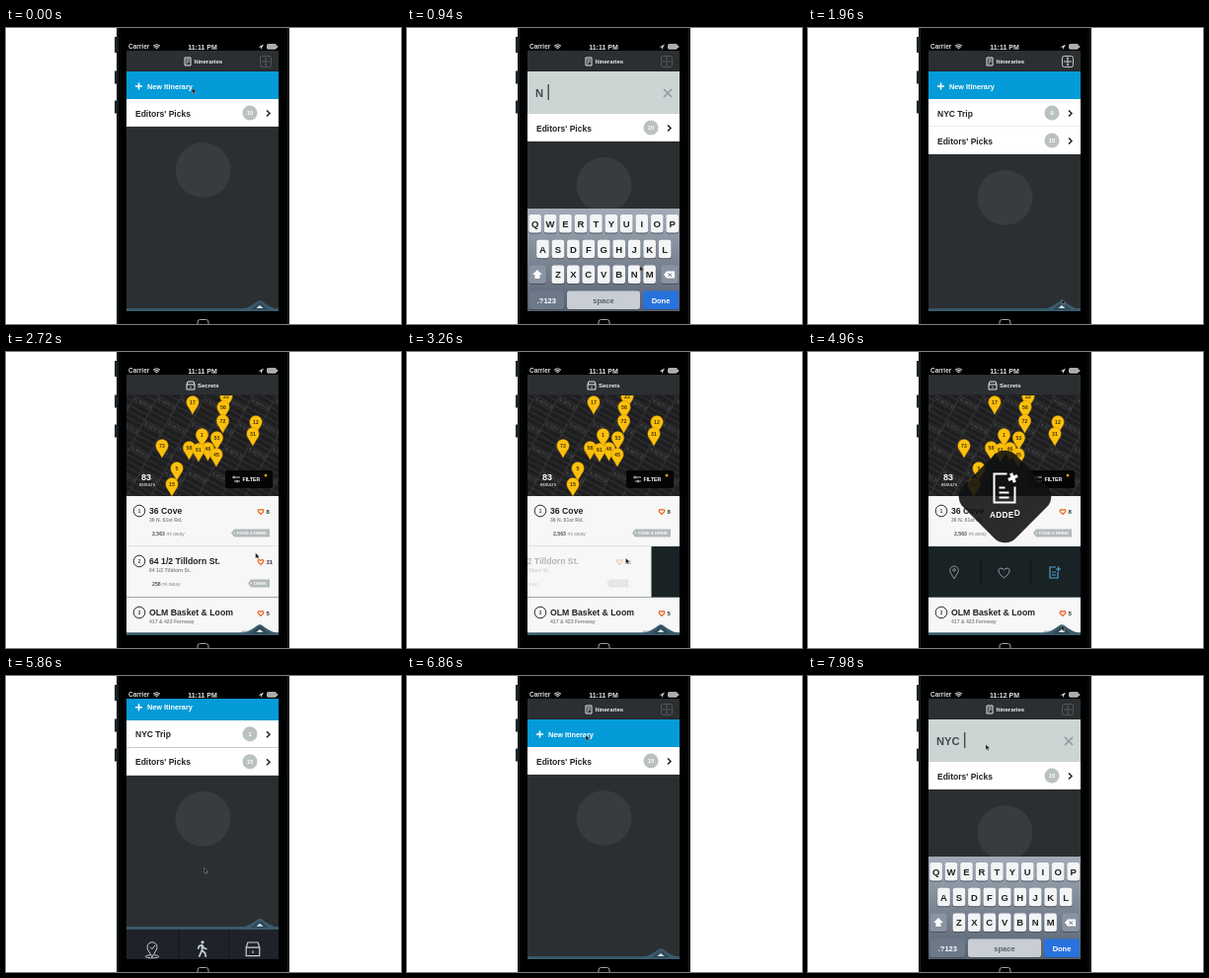
Write an HTML page with a canvas that moves like this. It is 400 px wide and 300 px high and loops after 8 s.

```html
<!DOCTYPE html>
<html lang="en">
<head>
<meta charset="utf-8">
<title>Itinerary app</title>
<style>
html, body { margin: 0; width: 100%; height: 100%; overflow: hidden; background: #fff; }
canvas { display: block; width: 100vw; height: 100vh; }
</style>
</head>
<body>
<canvas id="stage"></canvas>
<script>
const LOOP = 8000;
const LEFT = 122, WIDTH = 154, TOP = 23, BOTTOM = 287, MENU = 104;
const BLUE = '#049bd8', DARK = '#2b2f32', GOLD = '#fdc00d', INK = '#222';
const canvas = document.getElementById('stage');
const c = canvas.getContext('2d');
const ratio = window.devicePixelRatio || 1;
canvas.width = 400 * ratio;
canvas.height = 300 * ratio;

const clamp = v => Math.max(0, Math.min(1, v));
const ramp = (t, a, b) => { const p = clamp((t - a) / (b - a)); return p * p * (3 - 2 * p); };
const pulse = (t, a, b, d, e) => ramp(t, a, b) - ramp(t, d, e);
const between = (t, a, b) => t >= a && t < b;

function rect(x, y, w, h, fill) { c.fillStyle = fill; c.fillRect(x, y, w, h); }
function round(x, y, w, h, r, fill, stroke, line = 1) {
  c.beginPath(); c.roundRect(x, y, w, h, r);
  if (fill) { c.fillStyle = fill; c.fill(); }
  if (stroke) { c.strokeStyle = stroke; c.lineWidth = line; c.stroke(); }
}
function circle(x, y, r, fill, stroke, line) { round(x - r, y - r, 2 * r, 2 * r, r, fill, stroke, line); }
function path(d, x, y, { fill, stroke, line = 1, scale = 1 } = {}) {
  c.save(); c.translate(x, y); c.scale(scale, scale);
  const p = new Path2D(d);
  if (fill) { c.fillStyle = fill; c.fill(p); }
  if (stroke) { c.strokeStyle = stroke; c.lineWidth = line; c.stroke(p); }
  c.restore();
}
// y is the middle of the capitals
function text(s, x, y, size, color, align = 'left', weight = 'bold') {
  c.font = `${weight} ${size}px "Liberation Sans", Arial, sans-serif`;
  c.textAlign = align; c.fillStyle = color;
  c.fillText(s, x, y + size * 0.36);
}
function clipped(x, y, w, h, draw) {
  c.save(); c.beginPath(); c.rect(x, y, w, h); c.clip(); draw(); c.restore();
}
function shifted(dx, dy, draw) { c.save(); c.translate(dx, dy); draw(); c.restore(); }

const PLUS = 'M-3.5 0H3.5M0-3.5V3.5';
const HEART = 'M0 3C-6-1-3-5 0-2 3-5 6-1 0 3Z';
const PIN = 'M0 8C-2.5 3-5 1-5-2A5 5 0 0 1 5-2C5 1 2.5 3 0 8Z';

const docIcon = (x, y, color, line = 1) =>
  path('M-3-4H3V4H-3ZM-1.5-2H1.5M-1.5 0H1.5M-1.5 2H0', x, y, { stroke: color, line });
const boxIcon = (x, y, color, line = 1, scale = 1) =>
  path('M-4-1L-3-4H3L4-1V4H-4ZM-4-1H4M0 1V2.5', x, y, { stroke: color, line, scale });
const walker = (x, y, color) => {
  circle(x + 0.5, y - 7, 1.6, color);
  path('M0-4.5V1L-3 8M0 1L3 4L4 8M-4 0L-3-3L0-4L2-1L5 0', x, y, { stroke: color, line: 1.7 });
};

function phone(t) {
  rect(0, 0, 400, 300, '#fff');
  [[9, 16], [43.5, 13], [73.5, 13]].forEach(([y, h]) => rect(110, y, 3, h, '#20272c'));
  rect(112, 0, 175, 300, '#161d22');
  rect(114, 0, 171, 300, '#020303');
  rect(117, 0, 165, 300, '#000');
  round(194, 295.5, 11, 10, 2.5, null, '#a0a4a6', 1);
  text('Carrier', 124, 19, 6.5, '#ddd');
  [1.4, 3.2, 5].forEach(r => {
    c.beginPath(); c.arc(152.5, 22, r, -2.3, -0.84);
    c.strokeStyle = '#ddd'; c.lineWidth = 1.1; c.stroke();
  });
  text(t < 7700 ? '11:11 PM' : '11:12 PM', 199, 19, 7, '#e4e4e4', 'center');
  path('M-2.5.5L3-2.5L0 3V.5Z', 258, 19, { fill: '#ddd' });
  round(264.5, 16.6, 9, 4.6, 0.8, '#aaa', '#ddd', 0.7);
  rect(274.2, 18, 1, 2, '#ddd');
}

function header(title, icon) {
  rect(LEFT, TOP, WIDTH, 21, DARK);
  rect(LEFT, TOP + 20.4, WIDTH, 0.6, '#1d2022');
  const itineraries = title === 'Itineraries';
  icon(itineraries ? 184 : 187, TOP + 11, '#e8e8e8');
  text(title, itineraries ? 190.5 : 194, TOP + 11, 6, '#eee');
}

function itemRow(name, y, { count, radio } = {}) {
  const selectable = radio !== undefined;
  rect(LEFT, y, WIDTH, 28, '#fff');
  rect(LEFT, y + 27.5, WIDTH, 0.5, '#d4d8d9');
  text(name, selectable ? 150 : 131, y + 14.5, 8.5, INK);
  if (selectable) {
    circle(135, y + 14, 7, '#e1eded', '#bfcccf', 0.8);
    if (radio) circle(135, y + 14, 4.7, '#108fcb', '#0873a8', 0.6);
  } else {
    circle(247, y + 14, 7.5, '#bac1c1');
    text(count, 247, y + 14, 5.7, '#fff', 'center');
    path('M-1.5-3L1.5 0L-1.5 3', 265.5, y + 14.5, { stroke: INK, line: 1.5 });
  }
}

function newRow(y, hint = 1) {
  rect(LEFT, y, WIDTH, 28, BLUE);
  c.save(); c.globalAlpha = hint;
  path(PLUS, 134.5, y + 15, { stroke: '#fff', line: 1.5 });
  text('New Itinerary', 143, y + 15, 7.3, '#fff');
  c.restore();
}

const seal = y => circle(199.5, y, 28, '#363c3f');

function typedText(t) {
  const n = t < 4000 ? Math.floor((t - 890) / 58) + 1 : Math.floor((t - 7380) / 240) + 1;
  return 'NYC Trip'.slice(0, Math.max(0, n));
}

function itineraries(t) {
  const grow = pulse(t, 860, 940, 1470, 1600) + ramp(t, 6950, 7100);
  const trip = pulse(t, 1470, 1650, 6640, 6800);
  const editing = between(t, 860, 1530) || t >= 6950;
  rect(LEFT, TOP, WIDTH, 400, DARK);
  header('Itineraries', docIcon);
  const tool = trip > 0.5 ? '#d8dbdc' : '#565c60';
  round(257.5, 28.5, 11, 11, 2, null, tool, 0.9);
  path('M-4 0H4M0-4V4M-1-3L0-4L1-3M-1 3L0 4L1 3', 263, 34, { stroke: tool, line: 0.9 });
  const height = 28 + 15 * grow, listTop = 44 + height;
  if (editing) {
    rect(LEFT, 44, WIDTH, height, '#cdd4d4');
    const s = typedText(t);
    text(s, 130, 66, 11.2, '#444b4e');
    const caret = 130 + c.measureText(s).width + 4.5;
    rect(caret, 57, 1.2, 16, '#333');
    path('M-4-4L4 4M4-4L-4 4', 264, 66, { stroke: '#8f9899', line: 1.5 });
  } else {
    rect(LEFT, 44, WIDTH, height, BLUE);
    newRow(44, 1 - 0.5 * pulse(t, 120, 200, 860, 861));
  }
  clipped(LEFT, listTop, WIDTH, 28 * trip, () =>
    itemRow('NYC Trip', listTop, { count: t > 4300 ? '1' : '0' }));
  itemRow("Editors' Picks", listTop + 28 * trip, { count: '15' });
  seal(listTop + 28 * trip + 72);
}

const PINS = [[189, 51, 17], [223, 45, 22], [220, 56, 56], [219.5, 70, 72], [253, 71, 12], [250, 83, 31],
  [198.5, 84, 1], [213.5, 87, 53], [158, 95, 73], [185.5, 97, 58], [204.5, 98, 46], [195, 99, 61],
  [213, 104, 45], [173, 118, 5], [168, 134, 15]];

function map() {
  clipped(LEFT, 44, WIDTH, 102, () => {
    rect(LEFT, 44, WIDTH, 102, '#333335');
    c.save(); c.translate(199, 95); c.rotate(0.5);
    for (let i = -6; i < 6; i++) for (let j = -16; j < 16; j++) {
      rect(i * 21, j * 5.6, 19.8, 4.6, '#1f1f21');
      if ((i * 2 + j) % 5 === 0) text(`N ${44 - j}TH ST`, i * 21 + 1, j * 5.6 + 2.3, 4.2, '#68686b', 'left', 'normal');
    }
    c.restore();
    PINS.forEach(([x, y, n]) => {
      path(PIN, x, y + 2.2, { fill: GOLD, stroke: '#b98500', line: 0.3, scale: 1.26 });
      text(n, x, y, 5.2, '#453500', 'center');
    });
    text('83', 137, 127, 9, '#fff');
    text('RESULTS', 135, 134.5, 3.5, '#ddd');
    round(222, 120, 48, 18, 2, '#050505');
    path('M-4-2H4M-2 2H4M-2-3.4V-.6M1 .6V3.4', 233, 129, { stroke: '#ddd', line: 0.9 });
    text('FILTER', 239.5, 129, 5.2, '#fff');
    circle(263, 125, 1.5, '#d99711');
  });
}

function placeContent(y, n, name, street, miles, likes, tag) {
  circle(135, y + 15, 5.8, null, '#333', 1);
  text(n, 135, y + 15, 4.5, '#333', 'center');
  text(name, 145, y + 15, 8.7, INK);
  text(street, 145, y + 24, 5.1, '#85898a');
  text(miles, 148, y + 38.5, 5.2, '#555');
  text('mi away', 148 + c.measureText(miles + ' ').width, y + 38.5, 5, '#888', 'left', 'normal');
  path(HEART, 258, y + 16, { stroke: '#ee6a2c', line: 1.6, scale: 0.8 });
  text(likes, 263.5, y + 15.5, 6, '#333');
  c.font = 'bold 4.1px "Liberation Sans", Arial, sans-serif';
  const tagLeft = 258 - c.measureText(tag).width;
  path(`M0 0L3-4H${267 - tagLeft}V4H3Z`, tagLeft, y + 37.5, { fill: '#b3babb' });
  circle(tagLeft + 3.3, y + 37.5, 0.8, '#f7f7f7');
  text(tag, tagLeft + 6, y + 37.5, 4.1, '#fff');
}

function actions(alpha) {
  rect(LEFT, 197, WIDTH, 52, '#192225');
  c.save();
  c.globalAlpha = alpha;
  [174.5, 225].forEach(x => rect(x, 210, 0.8, 26, '#0c1214'));
  path(PIN, 148, 223, { stroke: '#9da9ad', scale: 0.85 });
  circle(148, 221, 1.3, null, '#9da9ad', 0.8);
  path(HEART, 198.5, 224, { stroke: '#9da9ad', line: 0.6, scale: 1.6 });
  path('M2-5H-4V6H4V0M-2 0H2M-2 3H2M2-3H7M4.5-5.5V-.5', 249, 223, { stroke: '#4ea6d0', line: 1.2 });
  c.restore();
}

function secrets(t) {
  rect(LEFT, TOP, WIDTH, 400, '#f7f7f7');
  map();
  header('Secrets', boxIcon);
  placeContent(146, '1', '36 Cove', '36 N. 61st Rd.', '2,563', '8', 'FOOD & DRINK');
  const edge = WIDTH * ramp(t, 3195, 3435);
  actions(ramp(edge, 30, WIDTH));
  clipped(LEFT, 197, WIDTH - edge, 51.5, () => {
    rect(LEFT, 197, WIDTH, 52, '#f7f7f7');
    c.globalAlpha = 1 - 0.7 * clamp(edge / 28);
    shifted(-edge * 1.5, 0, () =>
      placeContent(197, '2', '64 1/2 Tilldorn St.', '64 1/2 Tilldorn St.', '258', '31', 'DRINK'));
  });
  rect(LEFT, 196.5, WIDTH, 0.6, '#cfd2d3');
  rect(LEFT, 248.6, WIDTH, 0.6, '#cfd2d3');
  placeContent(249, '3', 'OLM Basket & Loom', '417 & 423 Fernway', '2,565', '5', 'SHOPPING');
}

function menu(open) {
  const top = BOTTOM - MENU * open;
  rect(LEFT, top, WIDTH, MENU, '#1f2229');
  [174.5, 225].forEach(x => rect(x, top, 0.7, MENU, '#12151a'));
  rect(LEFT, top + 52, WIDTH, 0.7, '#12151a');
  const color = '#c3d2d2', y = top + 20;
  path(PIN, 148, y, { stroke: color });
  path('M-2-2L0 0L3-4M-2 6C-10 7-7 9 0 9S10 7 2 6', 148, y, { stroke: color });
  walker(198.5, y, color);
  boxIcon(250, y, color, 0.7, 1.7);
  docIcon(199, y + 52, color, 1.2);
  path(HEART, 148, y + 53, { stroke: color, line: 0.7, scale: 1.6 });
  circle(250, y + 52, 5, null, color, 1.2);
  ['Nearby', 'Walks', 'Secrets', 'Saved', 'Itineraries', 'Search'].forEach((s, i) =>
    text(s, 148 + (i % 3) * 51, top + 40 + Math.floor(i / 3) * 52, 5, color, 'center'));
}

function tab(y) {
  const color = '#3b5d6e';
  rect(LEFT, y - 2.7, WIDTH, 2.7, color);
  path('M-19-2Q-11-3-3-9.5Q0-12 3-9.5Q11-3 19-2V0H-19Z', 257, y, { fill: color });
  path('M-9-1.5L-2-8Q0-9.5 2-8L9-1.5Z', 257, y, { fill: '#2f4857' });
  path('M-3.5-3L0-6L3.5-3Z', 257, y, { fill: '#dbe8ed' });
}

function keyCap(label, x, y, w, { fill = '#f3f4f5', color = INK, size = 9.5 } = {}) {
  round(x, y + 1, w, 18.5, 2.3, '#4b535e');
  round(x, y, w, 18.5, 2.3, fill);
  text(label, x + w / 2, y + 9.3, size, color, 'center');
}

function keyboard(t, up) {
  const top = BOTTOM - 104 * up;
  const g = c.createLinearGradient(0, top, 0, top + 104);
  g.addColorStop(0, '#a2abb7'); g.addColorStop(1, '#566170');
  rect(LEFT, top, WIDTH, 104, g);
  const pressed = between(t, 7620, 7680) ? 'Y' : between(t, 7860, 7920) ? 'C' : '';
  [['QWERTYUIOP', 123.3], ['ASDFGHJKL', 131.2], ['ZXCVBNM', 146.6]].forEach(([letters, x], row) =>
    [...letters].forEach((k, i) => keyCap(k, x + i * 15.45, top + 6 + row * 25.8, 12.6,
      { fill: k === pressed ? '#b9bec6' : '#f3f4f5' })));
  const grey = { fill: '#8993a1', color: '#fff', size: 7 };
  keyCap('', 123.3, top + 57.6, 17.5, grey);
  const shift = between(t, 7520, 7620) || between(t, 7760, 7860);
  path('M0-5L5 0H2.5V4H-2.5V0H-5Z', 132, top + 67, { fill: shift ? '#4fa9f5' : '#fff' });
  keyCap('', 257.2, top + 57.6, 17.5, grey);
  path('M-6 0L-3-3.5H5V3.5H-3Z', 266, top + 67, { fill: '#fff' });
  path('M-1.5-1.5L2 2M2-1.5L-1.5 2', 266, top + 67, { stroke: '#667' });
  keyCap('.?123', 123.3, top + 83.5, 36, { fill: '#6d7888', color: '#fff', size: 7.5 });
  keyCap('space', 162, top + 83.5, 74, { fill: '#c9ced5', color: '#59616c', size: 7.5 });
  keyCap('Done', 239, top + 83.5, 36, { fill: '#2872dd', color: '#fff', size: 7.5 });
}

function picker(t, up) {
  shifted(0, 248 * (1 - up), () => {
    rect(LEFT, 39, WIDTH, 248, '#2c2f31');
    rect(LEFT, 39, WIDTH, 21, '#25292c');
    round(125, 42, 34, 15, 2, '#16191b');
    round(244, 42, 28, 15, 2, '#16191b');
    text('Cancel', 142, 49.5, 5.8, '#eee', 'center');
    text('Done', 258, 49.5, 5.8, '#eee', 'center');
    newRow(60);
    itemRow('NYC Trip', 88, { radio: t >= 4300 });
    itemRow("Editors' Picks", 116, { radio: false });
    seal(187.5);
  });
}

function added(t, alpha) {
  c.save();
  c.globalAlpha = alpha;
  c.translate(199.5, 146.5);
  c.scale(0.8 + 0.2 * alpha, 0.8 + 0.2 * alpha);
  c.save(); c.rotate(Math.PI / 4);
  round(-37.5, -37.5, 75, 75, 15, 'rgba(14,15,16,.88)');
  c.restore();
  path('M2-23H-11V6H10V-10M-6-9H0M-6-4H4M-6 1H4', 0, 0, { stroke: '#fff', line: 2 });
  c.save(); c.translate(8, -19); c.rotate(-0.8 * (1 - ramp(t, 4880, 5040)));
  path('M-5 0H5M0-5V5', 0, 0, { stroke: '#111', line: 5 });
  path('M-5 0H5M0-5V5', 0, 0, { stroke: '#fff', line: 3.2 });
  c.restore();
  [...'ADDED'].forEach((k, i) => {
    const p = clamp((t - 4835 - i * 25) / 50);
    text(k, -12.5 + i * 6.2, 18.5 - 2 * Math.sin(Math.PI * p), 8.3, '#fff', 'center');
  });
  c.restore();
}

// time, x, y of the pointer tip
const POINTER = [[0, 188.5, 61], [200, 188.5, 61], [700, 235, 240], [880, 235, 240], [1400, 257, 274], [1900, 257, 273],
  [2080, 257, 280], [2420, 250, 202], [2540, 250, 202], [3120, 262, 210], [3195, 262, 210],
  [3260, 221.5, 209], [3430, 150, 212], [3820, 250, 222], [3930, 250, 222], [4250, 160, 103],
  [4320, 160, 103], [4520, 251, 47], [4630, 251, 47], [4960, 256.5, 277], [5430, 257, 279],
  [5640, 202, 250], [5720, 202, 250], [5860, 200.5, 194.5], [6360, 240, 86], [6600, 160, 86],
  [6860, 181, 60], [6960, 181, 60], [7300, 180, 69.5], [8000, 180, 69.5]];

function pointer(t) {
  const i = POINTER.findIndex(p => p[0] > t);
  const [a, ax, ay] = POINTER[i - 1], [b, bx, by] = POINTER[i];
  const p = ramp(t, a, b);
  path('M0 0V5.2L1.3 4.1L2.2 6L3.1 5.6L2.3 3.8H4Z', ax + (bx - ax) * p, ay + (by - ay) * p,
    { fill: '#111', stroke: '#bbb', line: 0.4 });
}

function frame(now) {
  const t = now % LOOP;
  c.setTransform(canvas.width / 400, 0, 0, canvas.height / 300, 0, 0);
  phone(t);
  const onSecrets = between(t, 2500, 5720);
  const open = pulse(t, 2080, 2300, 2510, 2720) + pulse(t, 5430, 5610, 5740, 5928);
  const sheet = pulse(t, 3930, 4220, 4620, 4820);
  const keys = pulse(t, 120, 440, 1470, 1660) + ramp(t, 6950, 7200);
  const toast = pulse(t, 4820, 4910, 5290, 5400);
  clipped(LEFT, TOP, WIDTH, BOTTOM - TOP, () => {
    c.save();
    c.translate(199, TOP + 4 * sheet);
    c.scale(1 - 0.25 * sheet, 1 - 0.25 * sheet);
    c.translate(-199, -TOP);
    shifted(0, -MENU * 0.9 * open, () => (onSecrets ? secrets : itineraries)(t));
    if (open > 0) menu(open);
    tab(BOTTOM - MENU * open);
    c.restore();
    if (sheet > 0) {
      rect(LEFT, TOP, WIDTH, 264, `rgba(0,0,0,${0.45 * sheet})`);
      picker(t, sheet);
    }
    if (keys > 0) keyboard(t, keys);
    if (toast > 0) added(t, toast);
    pointer(t);
  });
}

const start = performance.now();
function tick() {
  frame(performance.now() - start);
  requestAnimationFrame(tick);
}
tick();
</script>
</body>
</html>
```
